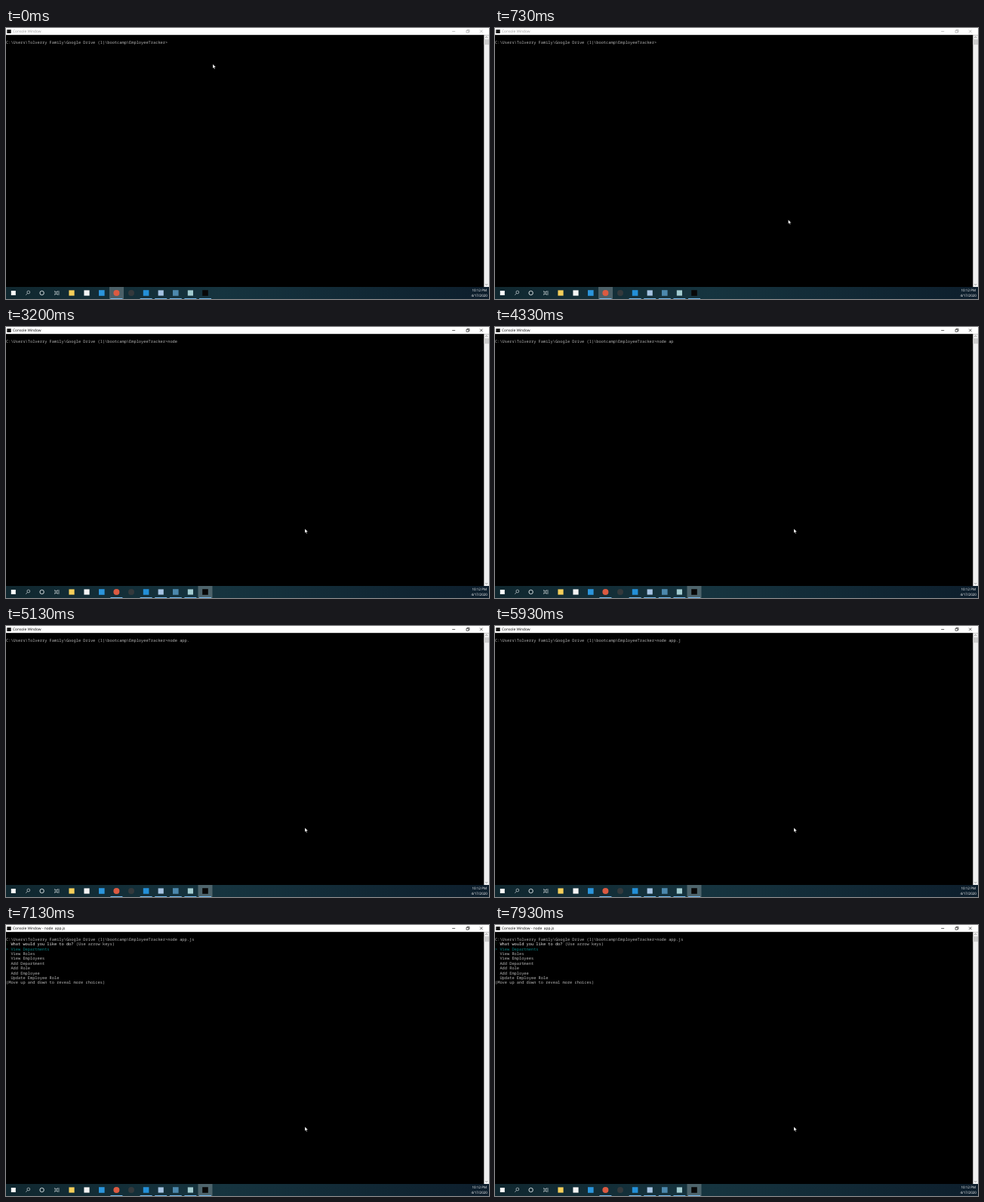
An HTML page for the animation above (8 s loop, 640 px wide and 360 px high).

```html
<!DOCTYPE html>
<html lang="en">
<head>
<meta charset="utf-8">
<title>Console</title>
<style>
  html, body { margin: 0; height: 100%; overflow: hidden; background: #000; }
  svg { display: block; width: 100vw; height: 100vh; }
  text { white-space: pre; text-rendering: geometricPrecision; }
  #screen { font: 5.333px "Noto Sans Mono", monospace; fill: #b8b8b8; }
  .ui { font: 4.85px "Open Sans", sans-serif; }
  .clock { font: 4.55px "Open Sans", sans-serif; fill: #fff; text-anchor: middle; }
  .line { fill: none; stroke-width: .6; }
</style>
</head>
<body>
<svg viewBox="0 0 640 360">
  <defs>
    <linearGradient id="bar">
      <stop offset="0" stop-color="#10272f"/>
      <stop offset=".45" stop-color="#16343f"/>
      <stop offset="1" stop-color="#0d1e2c"/>
    </linearGradient>
  </defs>
  <rect width="640" height="360"/>

  <!-- title bar -->
  <rect width="640" height="9.2" fill="#fff"/>
  <rect x="1.3" y="2.2" width="5.4" height="4.8" fill="#111"/>
  <g id="head">
    <text id="title" class="ui" x="9" y="6.4" fill="currentColor"></text>
    <path class="line" stroke="currentColor"
      d="M591.2 4.5h4M610 3.3h3v3h-3zM611 3.3v-1h3v3h-1M628 2.6l3.6 3.6M631.6 2.6l-3.6 3.6"/>
  </g>

  <g id="screen"></g>

  <!-- scrollbar -->
  <rect x="633.3" y="9.2" width="6.7" height="335" fill="#f0f0f0"/>
  <rect x="633.3" y="15.2" width="6.7" height="7" fill="#cdcdcd"/>
  <path class="line" stroke="#555" d="M635.2 13l1.5-1.5 1.5 1.5M635.2 340l1.5 1.5 1.5-1.5"/>

  <!-- taskbar -->
  <rect y="344" width="640" height="16" fill="url(#bar)"/>
  <rect id="active" y="344" width="19" height="16" fill="#fff" opacity=".24"/>
  <g id="icons"></g>
  <g class="line" stroke="#e8eef0">
    <circle cx="29.8" cy="351" r="1.9"/>
    <path d="M28.5 352.4l-2.2 2.4M64.5 349.2v1.2h4v-1.2M64.5 354.8v-1.2h4v1.2M64.5 352h4M70 349.2v5.6"/>
    <circle cx="47.6" cy="352" r="2.7" stroke-width=".9"/>
  </g>
  <text class="clock" x="627.2" y="350.4">10:12 PM</text>
  <text class="clock" x="627.2" y="357.4">4/17/2020</text>

  <path id="mouse" fill="#fff" stroke="#000" stroke-width=".3"
    d="M0 0V5.6L1.3 4.4 2.2 6.4 3.1 6 2.2 4.1H4Z"/>
</svg>
<script>
const $ = id => document.getElementById(id);
const svgNS = "http://www.w3.org/2000/svg";

function add(parent, tag, attrs, content = "") {
  const el = document.createElementNS(svgNS, tag);
  for (const key in attrs) el.setAttribute(key, attrs[key]);
  el.textContent = content;
  parent.append(el);
  return el;
}

// Console text on a grid of character cells
const cellW = 3.2, rowH = 6.4;
const put = (parent, col, row, str, fill) =>
  add(parent, "text", { x: col * cellW, y: 20.7 + row * rowH, ...(fill && { fill }) }, str);

const prompt = "C:\\Users\\Tolverry Family\\Google Drive (1)\\bootcamp\\EmployeeTracker>";
const command = "node app.js";
const keyTimes = [2000, 2200, 2530, 2800, 3930, 4060, 4260, 4600, 5130, 5660, 6130];
const enterTime = 6400, menuTime = 6660;

const input = put($("screen"), 0, 0, prompt);
const menu = add($("screen"), "g", {});
put(menu, 0, 1, "?", "#0a2a0a");
put(menu, 2, 1, "What would you like to do?", "#eee");
put(menu, 29, 1, "(Use arrow keys)");
put(menu, 0, 2, "> View Departments", "#008080");
["View Roles", "View Employees", "Add Department", "Add Role", "Add Employee", "Update Employee Role"]
  .forEach((item, i) => put(menu, 2, i + 3, item));
put(menu, 0, 9, "(Move up and down to reveal more choices)");

// Taskbar: x, colour, half size, round, open
[
  [9.8, "#fff", 3],
  [87, "#f5cf5a", 3.6],
  [107, "#f4f4f4", 3.6],
  [126.8, "#2b95dc", 3.8],
  [146.4, "#dc5a41", 4, 1, 1],
  [166, "#34393c", 4, 1],
  [185.6, "#238fd8", 3.8, 0, 1],
  [205.2, "#a5c3e2", 3.6, 0, 1],
  [224.8, "#4c88ad", 3.8, 0, 1],
  [244.4, "#a2cbd0", 3.6, 0, 1],
  [264, "#080808", 3.8, 0, 1]
].forEach(([x, fill, r, round, open]) => {
  add($("icons"), "rect", { x: x - r, y: 352 - r, width: 2 * r, height: 2 * r, rx: round ? r : 0, fill });
  if (open) add($("icons"), "rect", { x: x - 8, y: 359, width: 16, height: 1, fill: "#76b9ed" });
});

const start = performance.now();

function draw(now) {
  const t = Math.max(0, now - start) % 8000;
  const focused = t >= 800;
  const p = Math.min(1, t / 860), ease = p * p * (3 - 2 * p);
  $("mouse").setAttribute("transform", `translate(${274 + 122 * ease} ${48 + 220 * ease})`);
  $("head").style.color = focused ? "#000" : "#999";
  $("active").setAttribute("x", focused ? 254.5 : 137);
  $("title").textContent = "Console Window" + (t >= enterTime ? " - node  app.js" : "");
  input.textContent = prompt + command.slice(0, keyTimes.filter(k => k <= t).length);
  menu.style.display = t >= menuTime ? "" : "none";
  requestAnimationFrame(draw);
}
draw(start);
</script>
</body>
</html>
```
